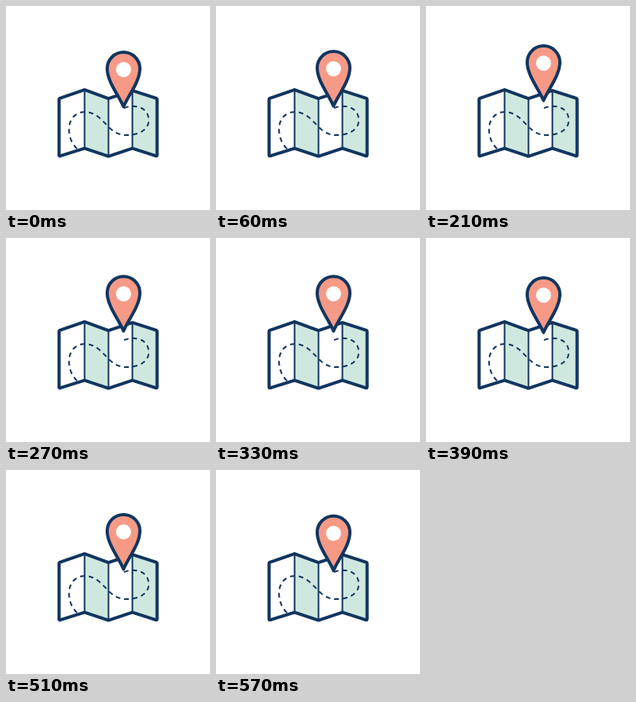
These frames come from a looping animation (256x256 px, 0.6 s). An HTML page:

```html
<!DOCTYPE html>
<html lang="en">
<head>
<meta charset="utf-8">
<title>Map pin</title>
<style>
  html, body { margin: 0; width: 100%; height: 100%; overflow: hidden; background: #fff; }
  svg { display: block; width: 100vw; height: 100vh; }
  .ink { stroke: #12355f; stroke-linejoin: round; }
</style>
</head>
<body>
<svg viewBox="0 0 256 256">
  <g class="ink" fill="none" transform="translate(-.4 .6)">
    <path d="M99 104.500L129 115.500V188L99 178ZM159 105.500L190 115.500V188L159 178Z" fill="#cfe8df" stroke="none"/>
    <path d="M99 105V178M129 116V188M159 106V178" stroke-width="2"/>
    <path d="M67 117Q67 115.500 68.500 115L99 104.500L129 115.500L159 105.500L188.500 115Q190 115.500 190 117V186.500Q190 188 188.500 187.500L159 178L129 188L99 178L68.500 187.500Q67 188 67 186.500Z" stroke-width="4"/>
    <path d="M148.500 127.500C160 122.500 179.500 125 179.500 143C179.500 155 166 161.500 152 161.500C126 161.500 124 132.500 99 132.500C86 132.500 79.500 143 79.500 154C79.500 164 83 172 89.500 178.500"
          stroke-width="2" pathLength="204" stroke-dasharray="6 5"/>
  </g>

  <g id="pin">
    <path class="ink" d="M147.500 126.500C141.500 112 127 95 127 78.500A20.500 20.500 0 0 1 168 78.500C168 95 153.500 112 147.500 126.500Z"
          fill="#f69a86" stroke-width="4"/>
    <circle cx="147.500" cy="79.700" r="9.500" fill="#fff"/>
  </g>
</svg>
<script>
  const LOOP = 600, STEP = 30, LIFT = 10;
  const pin = document.getElementById('pin');

  function draw() {
    const t = Math.floor(performance.now() % LOOP / STEP) * STEP;
    const y = -LIFT * (1 - Math.cos(2 * Math.PI * t / LOOP)) / 2;
    pin.setAttribute('transform', `translate(0 ${y.toFixed(2)})`);
    requestAnimationFrame(draw);
  }
  draw();
</script>
</body>
</html>
```
